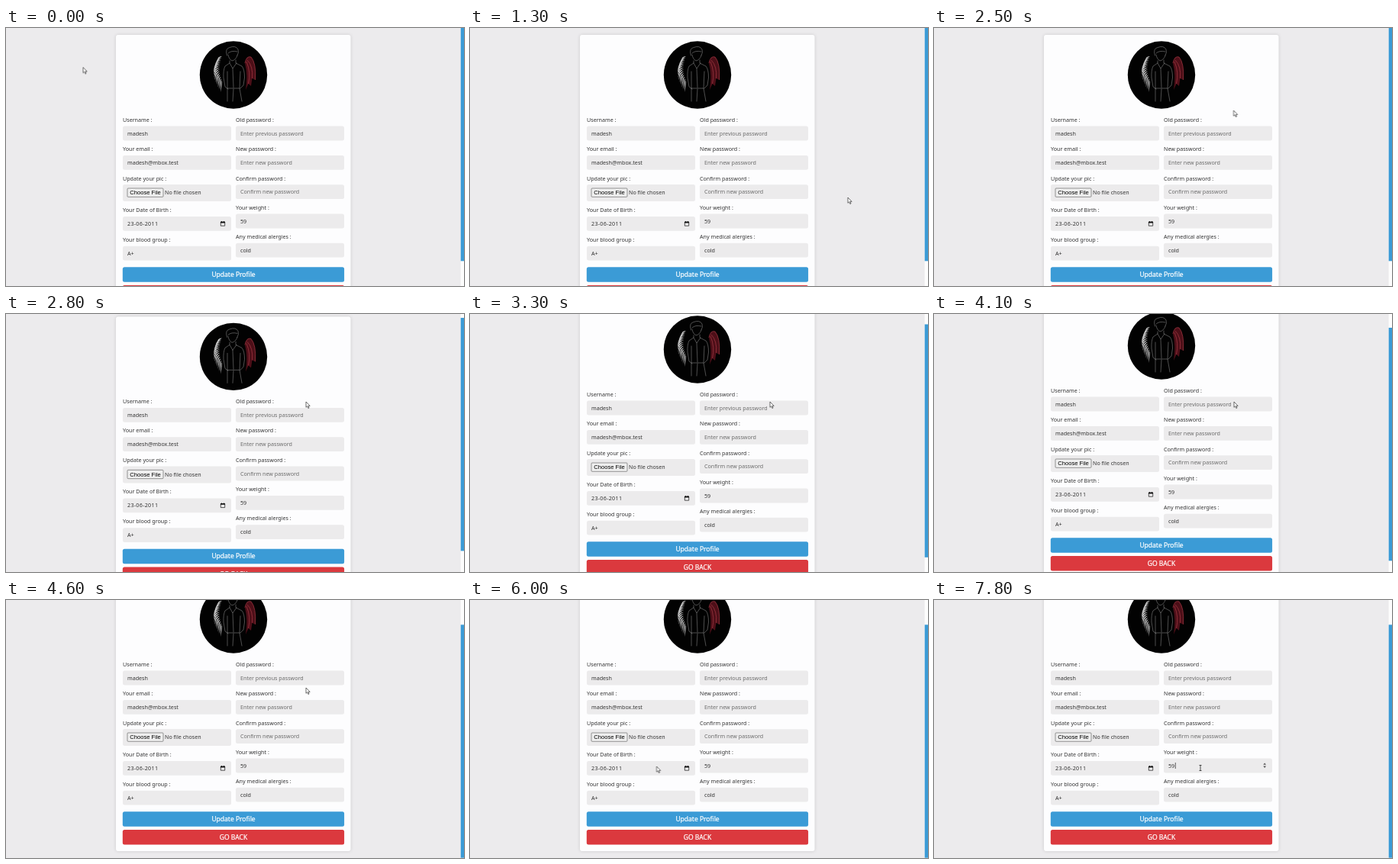
Animation, 600 px wide and 338 px high, one loop 8000 ms. Source, as an HTML page:

```html
<!DOCTYPE html>
<html lang="en">
<head>
<meta charset="utf-8">
<title>Edit profile</title>
<style>
  @property --scroll { syntax: "<length>"; inherits: true; initial-value: 0px; }
  html, body { margin: 0; width: 100%; height: 100%; overflow: hidden; background: #ecebed; }
  svg {
    display: block; width: 600px; height: 338px;
    font: 7.15px "Noto Sans", sans-serif; fill: #333;
    animation: scroll 8s step-end infinite;
  }
  #page { transform: translateY(calc(var(--scroll) * -1)); }
  #thumb { transform: translateY(calc(var(--scroll) * .9)); }
  .card { fill: #fdfdfe; filter: drop-shadow(0 0 2px #0002); }
  .box { fill: #ecebec; }
  .hint { fill: #6c6c6c; }
  .date { letter-spacing: .3px; }
  .file { font: 7.6px "Liberation Sans", Arial, sans-serif; fill: #000; }
  .button { font-size: 8.5px; fill: #fff; stroke: #fff; stroke-width: .22; text-anchor: middle; }
  .line { fill: none; stroke: #9a9a9a; stroke-width: .5; stroke-linecap: round; stroke-linejoin: round; }
  .blue { fill: #3b9bd6; }
  .red { fill: #db393e; }

  #pointer { animation: move 8s step-end infinite; }
  #arrow { animation: leave 8s step-end infinite; }
  .hover { animation: hover 8s step-end infinite; }
  #caret { animation: focus 8s step-end infinite; }

  @keyframes scroll {
    0% { --scroll: 0px; }
    31.25% { --scroll: 0px; animation-timing-function: steps(8); }
    41.25% { --scroll: 15px; animation-timing-function: steps(6); }
    48.75% { --scroll: 19px; }
    51.25% { --scroll: 20px; animation-timing-function: steps(5); }
    57.5%, 100% { --scroll: 36px; }
  }
  @keyframes move {
    0% { transform: translate(101px, 51.5px); }
    3.75% { transform: translate(101px, 51.5px); animation-timing-function: steps(4); }
    8.75% { transform: translate(290px, 65px); animation-timing-function: steps(4); }
    13.75% { transform: translate(466px, 98px); }
    16.25% { transform: translate(495px, 222px); }
    18.75% { transform: translate(495px, 222px); animation-timing-function: steps(5); }
    25% { transform: translate(349px, 158px); animation-timing-function: steps(4); }
    30% { transform: translate(392.5px, 108px); }
    32.5% { transform: translate(392.5px, 108px); animation-timing-function: steps(2); }
    35% { transform: translate(393px, 115px); }
    57.5% { transform: translate(393px, 115px); animation-timing-function: steps(3); }
    61.25% { transform: translate(246px, 148px); animation-timing-function: steps(4); }
    66.25% { transform: translate(112px, 178px); animation-timing-function: steps(5); }
    72.5% { transform: translate(200px, 217px); animation-timing-function: steps(2); }
    75% { transform: translate(244.5px, 218px); animation-timing-function: steps(3); }
    78.75% { transform: translate(261px, 238px); animation-timing-function: steps(4); }
    83.75% { transform: translate(254px, 259px); animation-timing-function: steps(5); }
    90% { transform: translate(318px, 262px); animation-timing-function: steps(4); }
    95% { transform: translate(346px, 226px); animation-timing-function: steps(2); }
    97.5%, 100% { transform: translate(349px, 220px); }
  }
  @keyframes leave { 0% { opacity: 1; } 93.75%, 100% { opacity: 0; } }
  @keyframes hover { 0% { opacity: 0; } 93.75%, 100% { opacity: 1; } }
  @keyframes focus { 0% { opacity: 0; } 96.25%, 100% { opacity: 1; } }
</style>
</head>
<body>
<svg viewBox="0 0 600 338">
  <g id="page">
    <rect class="card" x="144" y="9" width="307.5" height="356" rx="3"/>

    <circle cx="298" cy="61.5" r="44.2" fill="#020202"/>
    <g id="feathers" fill="#d6d6d6"></g>
    <path d="M313 46Q315 36 321 38Q328 46 326.500 68L322.500 66 321 76 317.500 73 314 81Q317 62 313 46Z" fill="#4d0f18"/>
    <path d="M313 46Q315 36 321 38Q328 46 326.500 68M316 42Q324 50 322.500 66M315 44Q321 58 317.500 73" fill="none" stroke="#a83a45" stroke-width=".7"/>
    <g class="line">
      <path d="M289.500 36Q286.500 27 293 25.500Q301 22.500 304 28Q305.500 32 303 36M291 33Q295 29 303 31M291 35Q292 41 296 43Q301 42 303 36"/>
      <path d="M293 43V46L287 50Q284.500 55 285 65L287 77 291 80M301 42V46L309 50Q312.500 54 312.500 65L311 75 307 79"/>
      <path d="M293 46L297 53 302 46M297 53L298 78M290 57V96M307 57L306 79 309 96M290 79H306M298 80L297 96"/>
    </g>

    <g id="fields"></g>

    <rect x="159" y="210" width="47" height="11.300" rx="1" fill="#efefef" stroke="#6b6b6b" stroke-width=".7"/>
    <text class="file" x="162.300" y="218.200">Choose File</text>
    <text x="208" y="218.200">No file chosen</text>
    <path d="M281.300 254.200H286.700V259.200H281.300Z" fill="none" stroke="#111" stroke-width=".7"/>
    <path d="M281 253.800H287V255.400H281ZM282 253H282.800V254H282ZM285.200 253H286V254H285.200Z" fill="#111"/>

    <rect class="blue" x="152.800" y="313.300" width="290.300" height="19.500" rx="2.500"/>
    <text class="button" x="298" y="326.100">Update Profile</text>
    <rect class="red" x="152.800" y="337" width="290.300" height="19.500" rx="2.500"/>
    <text class="button" x="298" y="349.900">GO BACK</text>

    <path class="hover" d="M431.300 251.800L433.200 249.500 435.100 251.800ZM431.300 253.600H435.100L433.200 255.900Z" fill="#555"/>
    <path id="caret" d="M316.300 249V257" stroke="#222" stroke-width=".7"/>
  </g>

  <rect x="595.700" width="4.300" height="338" fill="#fdfdfd"/>
  <rect id="thumb" class="blue" x="595.700" width="4.300" height="305.300"/>

  <g id="pointer">
    <path id="arrow" d="M0 0V7.300L1.700 5.800 2.900 8.500 4.100 8 2.900 5.400H5.200Z" fill="#fff" stroke="#333" stroke-width=".7"/>
    <path class="hover" d="M-1.500 -3.500H1.500M0 -3.500V3.500M-1.500 3.500H1.500" fill="none" stroke="#222" stroke-width=".8"/>
  </g>
</svg>
<script>
  // label, label centre y, box centre y, value, text class, box height
  const left = [
    ["Username :", 120, 138, "madesh"],
    ["Your email :", 158.5, 176.3, "madesh@mbox.test"],
    ["Update your pic :", 197, 216, "", "", 22],
    ["Your Date of Birth :", 238.3, 256.4, "23-06-2011", "date"],
    ["Your blood group :", 277.5, 295.2, "A+"]
  ];
  const right = [
    ["Old password :", 120, 138, "Enter previous password", "hint"],
    ["New password :", 158.5, 176.3, "Enter new password", "hint"],
    ["Confirm password :", 197, 214.6, "Confirm new password", "hint"],
    ["Your weight :", 235, 253, "59"],
    ["Any medical alergies :", 273.5, 291.2, "cold"]
  ];

  const field = x => ([label, labelY, y, value, kind = "", h = 18.8]) => `
    <text x="${x}" y="${labelY + 2.6}">${label}</text>
    <rect class="box" x="${x}" y="${y - h / 2}" width="142" height="${h}" rx="2.5"/>
    <text class="${kind}" x="${x + 6}" y="${y + 2.6}">${value}</text>`;

  document.getElementById("fields").innerHTML =
    left.map(field(153)).join("") + right.map(field(301)).join("");

  // Pointed feathers fan out from the shoulder and hang downwards.
  const feather = k => {
    const x = 283 - 3 * Math.sin(k * 3);
    const y = 37 + k * 32;
    const tipX = 280 - 8 * Math.sin(.4 + k * 2.9);
    const tipY = 43 + k * 41;
    return `<path d="M${x} ${y}Q${tipX} ${y} ${tipX} ${tipY}Q${tipX + 2} ${y + 2} ${x} ${y}"/>`;
  };
  document.getElementById("feathers").innerHTML =
    Array.from({ length: 14 }, (_, i) => feather(i / 13)).join("");
</script>
</body>
</html>
```
